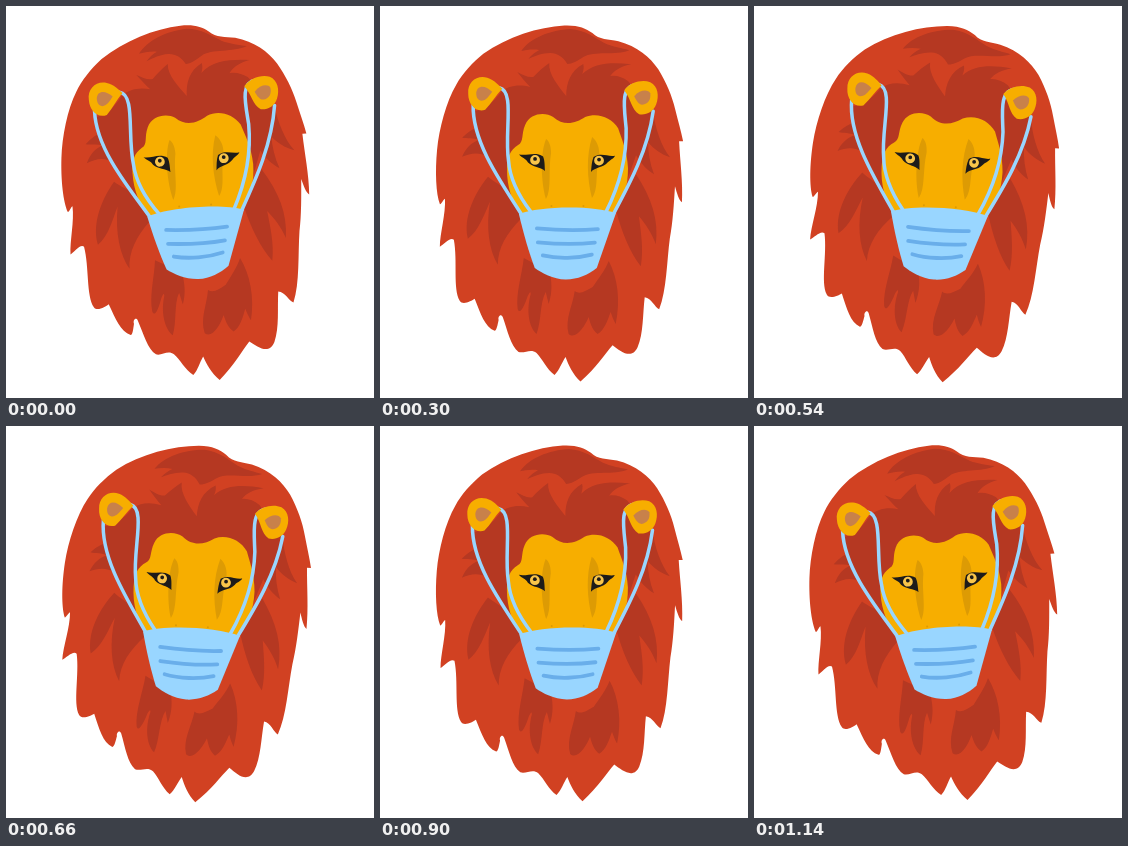
An HTML page for the animation above (1170 ms loop, 368 by 392 pixels).

```html
<!DOCTYPE html>
<html lang="en">
<head>
<meta charset="utf-8">
<title>Masked lion</title>
<style>
  @property --t {
    syntax: "<number>";
    inherits: false;
    initial-value: 0;
  }
  html, body {
    margin: 0;
    width: 100%;
    height: 100%;
    overflow: hidden;
    background: #fff;
  }
  svg { display: block; width: 368px; height: 392px; overflow: visible; }

  /* The whole head swings on a cosine, 39 steps of 30 ms */
  .lion {
    transform-origin: 182px 173px;
    transform: rotate(calc(-3.6deg * cos(var(--t) * 1turn)));
    animation: sway 1170ms steps(39) infinite;
  }
  @keyframes sway {
    from { --t: 0; }
    to { --t: 1; }
  }

  .mane { fill: #d14122; }
  .shade { fill: #b53822; }
  .skin { fill: #f7ae00; }
  .crease { fill: #dd9b04; }
  .inner { fill: #c8814a; }
  .eye { fill: #1d1b1a; }
  .iris { fill: #f9c54a; }
  .cloth { fill: #99d6ff; }
  .strap, .fold { fill: none; stroke-linecap: round; }
  .strap { stroke: #99d6ff; stroke-width: 3.5; }
  .fold { stroke: #69aeea; stroke-width: 3.8; }
</style>
</head>
<body>
<svg viewBox="0 0 368 392">
  <g class="lion">
    <path class="mane" d="M184 19.500C198 19 205 22 212 27C219 34 228 33 238 35C257 40 270 51 278 63
      C286 76 292 90 295 103C298 115 301 125 303 135L299 135C300 155 303 176 302 196C299 194 297 187 295 180
      C294 197 293 216 290 232C287 255 287 284 279.500 303C275 301 272 292 265 291C263 308 264 327 258 341
      C252 354 241 345 233 339C225 348 217 361 201 375.500C193 368 189 359 186 351C182 357 180 364 175 369
      C167 363 163 353 157 347C151 342 145 348 139 346C131 340 128 325 123 311C121 307 118 311 119 314
      C118 319 117 325 115 325C105 321 101 308 95 293C92 295 83 300 80 295C73 283 78 255 74 234
      C70 231 64 239 60 241C60 228 66 208 65 193C63 194 62 198 60 198.500C56 188 55 166 57 144
      C59 123 66 96 76 79C82 68 92 57 103 48C127 31 158 21 184 19.500Z"/>

    <g class="shade">
      <path d="M141 45C150 32 170 24 190 23C205 24 215 32 224 37C233 41 241 42 249 44C235 50 214 44 203 51
        C197 55 192 58 187 58C183 51 177 47 170 47C162 47 155 50 148 53C151 49 155 46 159 44C152 43 146 44 141 45Z"/>
      <path d="M137 66C143 69 148 72 153 71C158 66 163 61 169 57C168 68 178 80 186 90C186 77 190 65 203 58
        C204 62 203 65 202 68C214 56 232 56 251 58C241 60 234 64 230 70C236 69 242 71 248 75L273 106
        C275 121 281 140 290 151C281 148 274 143 268 136C268 147 270 157 274 168C266 163 260 156 256 149
        L238 200L128 160L133 200C126 190 118 173 108 151C99 146 91 147 82 151C86 142 91 137 99 134
        C93 132 87 133 82 132C88 126 92 124 96 122C93 118 92 112 92 106C104 104 112 98 121 86
        C128 80 138 78 150 81C145 76 141 71 137 66Z"/>
      <path d="M108 171C95 187 83 211 88 233C99 225 104 209 110 196C106 222 109 244 118 259
        C118 242 127 227 141 213L131 187C122 180 114 176 108 171Z"/>
      <path d="M256 168L236 204C242 226 250 246 261 260C264 243 261 226 259 210C266 218 272 227 276 238
        C279 214 272 192 256 168Z"/>
      <path d="M144 252C142 270 136 287 138 303C140 309 144 302 148 290C150 286 151 285 151 288
        C146 306 150 322 157 328C162 314 160 297 166 286C167 290 168 294 169 298C173 286 172 276 170 266Z"/>
      <path d="M195 285C193 300 185 313 189 328C196 334 205 321 209 311C211 319 213 324 218 328
        C225 324 228 314 231 306C233 312 234 314 236 318C241 295 238 272 229 255
        C225 265 219 272 213 281C206 285 200 289 195 285Z"/>
    </g>

    <path class="skin" d="M141 209C132 196 127 181 127 164C127 151 130 144 138 139C144 136 141 128 145 119
      C150 107 165 106 173 111C184 121 196 117 205 111C217 106 231 111 238 122C242 134 247 144 248 162
      C248 182 243 195 234 208Z"/>
    <g class="crease">
      <path d="M166 133C160 147 161 176 166 193C172 183 168 165 171 147C171 140 169 135 166 133Z"/>
      <path d="M212 131C206 150 207 172 212 192C219 183 215 166 219 151C220 142 217 135 212 131Z"/>
      <circle cx="171.500" cy="200" r="1"/>
      <circle cx="203.500" cy="200" r="1"/>
    </g>

    <path class="eye" d="M139 148.500C147 150.500 155 145 163 150.500C165 155 164.500 161 165 165C160 160.500 153 161.500 148 156.500C146 152.500 142 152 139 148.500Z"/>
    <path class="eye" d="M235 149.500C228 151 221 146 213.500 151C211.500 156 211.500 161 211 166C215 161 223 162 228 156C230 153.500 233 153 235 149.500Z"/>
    <circle class="iris" cx="155" cy="154" r="4.900"/>
    <circle class="iris" cx="219" cy="154.500" r="4.900"/>
    <circle class="eye" cx="155" cy="153" r="1.900"/>
    <circle class="eye" cx="219" cy="153.500" r="1.900"/>

    <g class="strap">
      <path d="M93 99C92 134 117 171 142 209"/>
      <path d="M119 82C135 85 124 126 128.500 155C130 175 141 193 151 206"/>
      <path d="M273 105C268 143 250 177 234 207"/>
      <path d="M256 78.500C240 80 244 101 246 122C247 155 236 186 226 206"/>
    </g>

    <path class="skin" d="M88 88C87 76 97 69 107 72C114 74 119 80 122 83C116 89 111 98 105 104C96 107 88 99 88 88Z"/>
    <path class="inner" d="M96 87C97 79 105 79 112 86C109 90 106 95 101 95C97 94 96 91 96 87Z"/>
    <path class="skin" d="M244 84C250 76 262 73 270 76C278 80 279 90 276 98C273 106 266 109 259 108C251 103 251 93 244 84Z"/>
    <path class="inner" d="M254 90C260 83 268 83 270 87C271 93 268 98 262 98.500C258 98 256 94 254 90Z"/>

    <path class="cloth" d="M139 208C160 200 213 199 236 207L217 262C208 269 198 273.500 186 273.500
      C173 273 162 267 155 262C149 246 144 229 139 208Z"/>
    <g class="fold">
      <path d="M157 222.500C175 224 200 224.500 218 223"/>
      <path d="M158 236.500C175 238 198 238.500 215 236.500"/>
      <path d="M163 249.500C178 253 197 252.500 212 248.500"/>
    </g>
  </g>
</svg>
</body>
</html>
```
